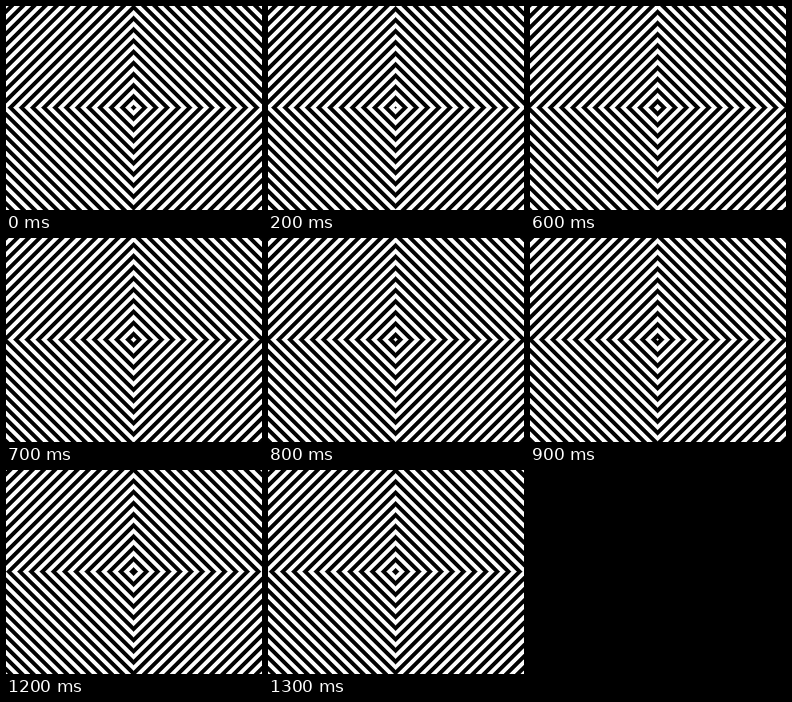
These frames come from a looping animation (320 px wide and 256 px high, 1.4 s). An HTML page with a canvas:

```html
<!DOCTYPE html>
<html lang="en">
<head>
<meta charset="utf-8">
<title>Diamond tunnel</title>
<style>
  html, body { margin: 0; width: 100%; height: 100%; overflow: hidden; background: #000; }
  canvas { display: block; width: 320px; height: 256px; image-rendering: pixelated; }
</style>
</head>
<body>
<canvas id="stage" width="320" height="256"></canvas>
<script>
  const W = 320, H = 256;
  const CX = 159, CY = 127;
  const PERIOD = 14, BAND = 7, STEP_MS = 100;
  const CORE = 3; // radius of the black core at time zero

  const ctx = document.getElementById('stage').getContext('2d');
  const image = ctx.createImageData(W, H);
  const pixels = new Uint32Array(image.data.buffer);
  const BLACK = 0xff000000, WHITE = 0xffffffff;
  let shown = -1;

  // Concentric diamonds, moving one pixel inward per step.
  function draw(step) {
    const shift = step + PERIOD - CORE - 1;
    for (let y = 0, i = 0; y < H; y++) {
      for (let x = 0; x < W; x++, i++) {
        const d = Math.abs(x - CX) + Math.abs(y - CY);
        pixels[i] = (d + shift) % PERIOD < BAND ? WHITE : BLACK;
      }
    }
    ctx.putImageData(image, 0, 0);
  }

  function tick() {
    const step = Math.floor(performance.now() / STEP_MS) % PERIOD;
    if (step !== shown) draw(shown = step);
    requestAnimationFrame(tick);
  }
  tick();
</script>
</body>
</html>
```
